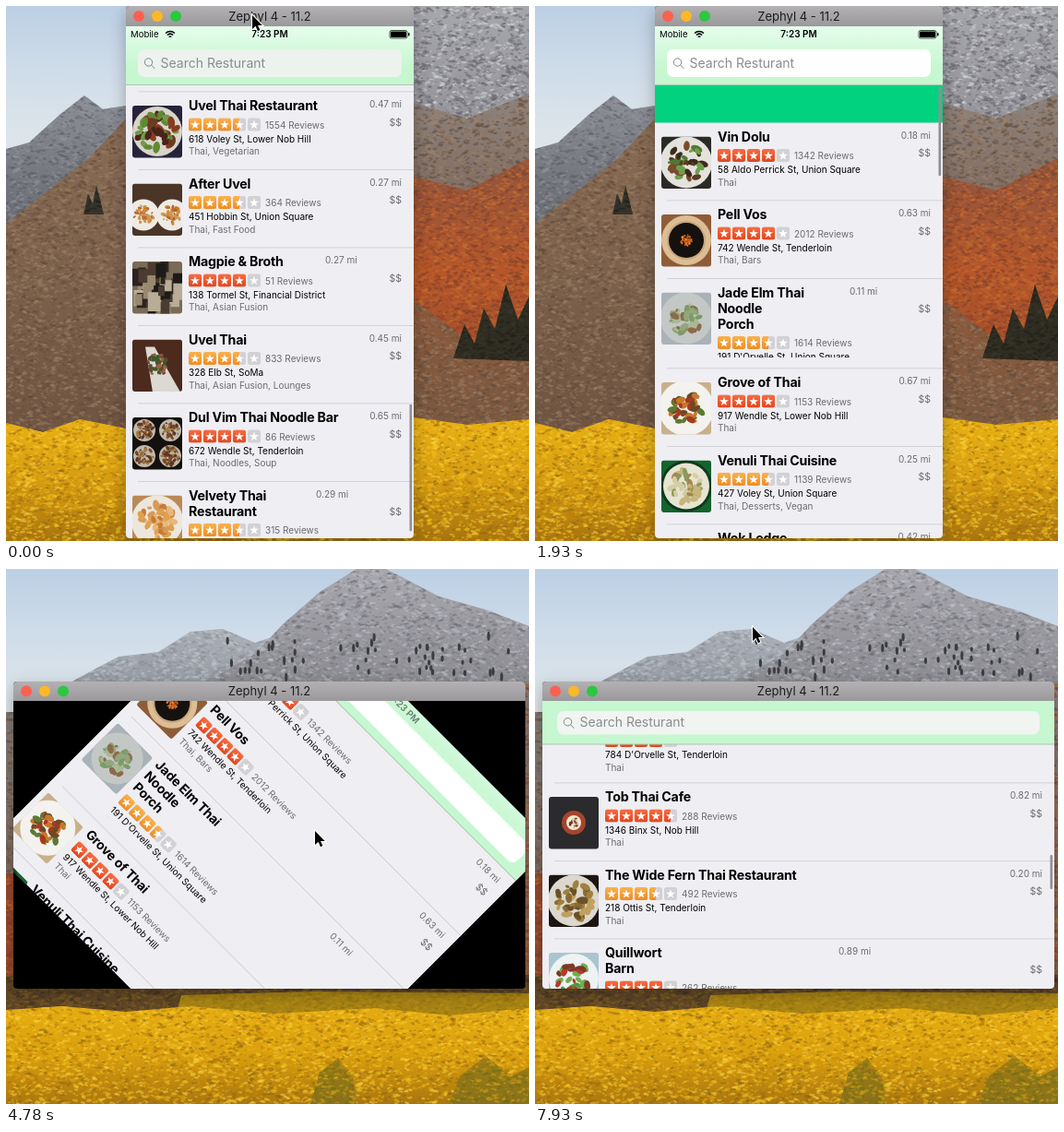
Animation, 567 px wide and 580 px high, one loop 8 s. Source, as an HTML page with a canvas:

```html
<!DOCTYPE html>
<html lang="en">
<head>
<meta charset="utf-8">
<title>Restaurant list, scrolled and rotated</title>
<style>
html, body { margin: 0; width: 100%; height: 100%; overflow: hidden; }
canvas { display: block; }
</style>
</head>
<body>
<canvas id="stage" width="567" height="580"></canvas>
<script>
const stage = document.getElementById('stage');
let c = stage.getContext('2d');
const FONT = 'Inter, "Open Sans", sans-serif';
const ROW = 84.5, LOOP = 8000;

// name lines split by "/"; photo: layout, backdrop, rings, food colours, spread
const rows = [
  ['Vin Dolu', '58 Aldo Perrick St, Union Square', 'Thai', 1342, 4, 0.18, 'one #2c2a26 #e4e2dc:28 #4f7a35,#5b3a22,#6f9e4a,#3d2a1c,#7a4b2c 23'],
  ['Pell Vos', '742 Wendle St, Tenderloin', 'Thai, Bars', 2012, 4, 0.63, 'one #8f5c38 #dcbd94:27,#c9a67c:21,#15110f:19 #e87f2a,#c95a1c 7'],
  ['Jade Elm Thai/Noodle/Porch', "191 D'Orvelle St, Union Square", 'Thai, Noodles', 1614, 3.5, 0.11, 'one #a9b2b8 #c3c8c6:28 #93a67c,#7d9a68,#8c6b4b,#a9b894 20', 211],
  ['Grove of Thai', '917 Wendle St, Lower Nob Hill', 'Thai', 1153, 4, 0.67, 'one #c9b08c #f4f2ee:30 #a5391f,#5c7a34,#c9762c,#6a4a26 20'],
  ['Venuli Thai Cuisine', '427 Voley St, Union Square', 'Thai, Desserts, Vegan', 1139, 3.5, 0.25, 'one #14642c #0d3a1c:28,#e6e4d2:25 #c7b57a,#8a9a5a,#a58550,#d6cca4 20'],
  ['Wok Ledge', '163 Ulm St, Financial District', 'Thai', 406, 4, 0.42, 'room #6b5444 - #3a2c26,#a8825c,#5c4638,#c0a888 30'],
  ['Plum Ladle Thai', '618 Mossen St, Tenderloin', 'Thai', 655, 4, 0.38, 'one #4a3325 #efece4:26 #c8782e,#6f8f3c,#9a4a24 20'],
  ['Sovi Garden', '235 Hobbin St, Union Square', 'Thai, Bars', 274, 3.5, 0.33, 'room #6a4a36 - #2a211c,#b08a5c,#d8b884 30'],
  ['Moro Thai/Noodle/Pantry', "784 D'Orvelle St, Tenderloin", 'Thai', 310, 4, 0.54, 'one #3a2c22 #f2efe8:26 #c88a3a,#5f8a38,#a54a22 20', 208],
  ['Tob Thai Cafe', '1346 Binx St, Nob Hill', 'Thai', 288, 4.5, 0.82, 'one #2b2a2c #a5452c:13,#f0e6d4:8 #5a2f20,#e6c9a4 6'],
  ['The Wide Fern Thai Restaurant', '218 Ottis St, Tenderloin', 'Thai', 492, 3.5, 0.20, 'one #1c1512 #dcd8ce:28 #a0803f,#8a6a34,#c0a060,#6b5028 23'],
  ['Quillwort/Barn', '1268 Tormel St, Nob Hill', 'Thai', 262, 4, 0.89, 'one #a9c5d0 #eef2f2:27 #4f9a3c,#b8382c,#6fae50,#7a3a28 21', 199],
  ['Ferny Spoon', '517 Mossen St, Nob Hill', 'Thai', 341, 4, 0.49, 'one #5a4030 #efeae0:26 #c87a2c,#6a8a38 20'],
  ['Lumo Thai', '844 Binx St, Tenderloin', 'Thai, Soup', 197, 4, 0.58, 'one #332820 #f0ece4:26 #b8642a,#d8a858 20'],
  ['Uvel Thai Restaurant', '618 Voley St, Lower Nob Hill', 'Thai, Vegetarian', 1554, 3.5, 0.47, 'one #26233a #d9d4ca:27 #5f8a34,#6a3c22,#4a2418,#8a3a22,#6f9a4a 24'],
  ['After Uvel', '451 Hobbin St, Union Square', 'Thai, Fast Food', 364, 3.5, 0.27, 'two #4a3526 #eeebe4:17 #d28a3c,#b8642a,#c89a5a 12'],
  ['Magpie & Broth', '138 Tormel St, Financial District', 'Thai, Asian Fusion', 51, 4, 0.27, 'room #7a6a58 - #2a241f,#b9ad98,#4a3c30,#98886e,#1d1a18 31', 216],
  ['Uvel Thai', '328 Elb St, SoMa', 'Thai, Asian Fusion, Lounges', 833, 3.5, 0.45, 'slant #4c2a1e - #5f4a34,#3a5a2c,#a0603c 14'],
  ['Dul Vim Thai Noodle Bar', '672 Wendle St, Tenderloin', 'Thai, Noodles, Soup', 86, 4, 0.65, 'four #14100e #c0b8ac:12 #7a4a28,#5c3820,#a07a48 11'],
  ['Velvety Thai/Restaurant', '392 Mossen St, Tenderloin', 'Thai, Noodles', 315, 3.5, 0.29, 'one #b98a58 #ece6dc:28 #e0a050,#c87a34,#e7b878,#d89a58 22', 206],
].map(([name, address, kind, reviews, stars, miles, photo, milesX]) =>
  ({ lines: name.split('/'), address, kind, reviews, stars, miles, photo, milesX }));

function random(seed) {
  return () => (seed = (seed * 16807 + 11) % 2147483647) / 2147483647;
}

// piecewise-linear value list from [time, ...values] keys
function at(keys, t) {
  let i = 1;
  while (i < keys.length - 1 && keys[i][0] < t) i++;
  const a = keys[i - 1], b = keys[i];
  const k = Math.min(1, Math.max(0, (t - a[0]) / (b[0] - a[0])));
  return a.slice(1).map((v, j) => v + (b[j + 1] - v) * k);
}
const mix = (a, b, k) => a + (b - a) * k;

const scrollKeys = [[0, 1201.5], [300, 1219], [600, 1224], [1330, 1224], [1480, 1090], [1630, 620],
  [1780, 150], [1930, -41], [2080, -22], [2230, -8], [2380, -2], [2530, 0], [6430, 0], [6580, 25],
  [6730, 110], [6880, 230], [7180, 510], [7480, 670], [7930, 780.5]];
const pointerKeys = [[0, 267, 10], [1180, 236, 440], [1330, 234, 449], [1480, 232, 520], [1630, 230, 600],
  [3980, 345, 600], [4180, 340, 525], [4780, 335, 284], [6280, 248, 319], [6430, 248, 319],
  [6880, 242, 200], [7180, 238, 132], [7480, 237, 132], [7630, 236, 60], [7930, 236, 63]];

function text(s, x, y, size, color = '#000', weight = 400, align = 'left') {
  c.font = `${weight} ${size}px ${FONT}`;
  c.fillStyle = color;
  c.textAlign = align;
  c.fillText(s, x, y + size * 0.36);
}
function box(x, y, w, h, r, fill) {
  c.beginPath();
  c.roundRect(x, y, w, h, r);
  c.fillStyle = fill;
  c.fill();
}
function oval(x, y, rx, ry, fill, turn = 0) {
  c.beginPath();
  c.ellipse(x, y, rx, ry, turn, 0, 7);
  c.fillStyle = fill;
  c.fill();
}
function fade(y0, y1, ...colors) {
  const g = c.createLinearGradient(0, y0, 0, y1);
  colors.forEach((color, i) => g.addColorStop(i / Math.max(1, colors.length - 1), color));
  return g;
}
function clipped(shape, draw) {
  c.save();
  c.beginPath();
  shape();
  c.clip();
  draw();
  c.restore();
}

function drawPhoto(look, seed, x, y) {
  const [layout, bg, rings, foods, spread] = look.split(' ');
  const rnd = random(seed * 977 + 5), colors = foods.split(',');
  const centres = { two: [[12, 34], [43, 34]], four: [[13, 14], [41, 14], [13, 42], [41, 42]] }[layout] || [[27, 28]];
  c.save();
  c.translate(x, y);
  clipped(() => c.roundRect(0, 0, 54, 56.5, 3), () => {
    c.fillStyle = bg;
    c.fillRect(0, 0, 54, 57);
    if (layout === 'slant') {
      c.fillStyle = '#dcd8d2';
      c.fill(new Path2D('M14 8L24 8 52 57 22 57Z'));
    }
    for (const [cx, cy] of centres) {
      if (rings !== '-') for (const ring of rings.split(',')) {
        const [color, r] = ring.split(':');
        oval(cx, cy, r, r, color);
      }
      for (let i = 0; i < 44; i++) {
        const a = rnd() * 6.3, d = spread * Math.sqrt(rnd()) * 0.85, size = spread * (0.1 + rnd() * 0.18);
        const px = cx + d * Math.cos(a), py = cy + d * Math.sin(a), color = colors[i % colors.length];
        if (layout === 'room') box(px - size, py - size, size * 1.6, size * 2.4, 0, color);
        else oval(px, py, size, size * 0.6, color, a * 3);
      }
    }
  });
  c.restore();
}

function drawStars(score, x, y) {
  const full = score < 4 ? fade(y, y + 14, '#fbb24c', '#f08c20') : fade(y, y + 14, '#fa6c40', '#e3451c');
  for (let i = 0; i < 5; i++) {
    const left = x + i * 16, part = Math.min(1, Math.max(0, score - i));
    box(left, y, 14, 14, 2.5, '#d2d2d5');
    if (part) clipped(() => c.rect(left, y, 14 * part, 14), () => box(left, y, 14, 14, 2.5, full));
    c.beginPath();
    for (let k = 0; k < 10; k++) {
      const r = k % 2 ? 2.1 : 5.2, a = k * Math.PI / 5;
      c.lineTo(left + 7 + r * Math.sin(a), y + 7.4 - r * Math.cos(a));
    }
    c.fillStyle = '#fff';
    c.fill();
  }
}

function drawRow(row, index, y, height, w, turn, hideMiles) {
  const shift = (row.lines.length - 1) * 17, gray = '#6b6b70';
  drawPhoto(row.photo, index + 1, 7, y + 15);
  clipped(() => c.rect(0, y, w, height - 12), () => {
    c.letterSpacing = '-0.2px';
    row.lines.forEach((line, i) => text(line, 68, y + 15 + i * 17, 14.2, '#000', 700));
    c.letterSpacing = '0px';
    drawStars(row.stars, 68, y + 28.5 + shift);
    text(row.reviews + ' Reviews', 151, y + 36 + shift, 10, gray);
    text(row.address, 68, y + 51 + shift, 10);
    text(row.kind, 68, y + 64.5 + shift, 10, gray);
  });
  const miles = row.miles.toFixed(2) + ' mi';
  if (!row.milesX) text(miles, w - 13, y + 13.5, 10, gray, 400, 'right');
  else if (!hideMiles) text(miles, row.milesX + (turn ? 122 : 0), y + 13.5, 10, gray);
  text('$$', w - 13, y + 33, 10.5, gray, 400, 'right');
  c.fillStyle = '#cbcbd0';
  c.fillRect(13, y + height - 0.5, w, 0.8);
}

function drawStatus(w) {
  text('Mobile', 5, 8.5, 9.6);
  text('7:23 PM', w / 2, 8.5, 10, '#000', 600, 'center');
  c.strokeStyle = '#000';
  c.lineWidth = 1.5;
  for (const r of [2, 4.7, 7.4]) {
    c.beginPath();
    c.arc(48, 13, r, -2.3, -0.84);
    c.stroke();
  }
  c.lineWidth = 0.7;
  c.beginPath();
  c.roundRect(w - 26, 4.5, 19, 8.5, 2);
  c.stroke();
  box(w - 25, 5.5, 17, 6.5, 1, '#000');
  box(w - 6, 7, 1.5, 3.5, 1, '#000');
}

function drawHeader(w, h, turn, field) {
  c.fillStyle = fade(-80 * turn, mix(45, 1, turn), '#e6fdec', '#c6f7d0');
  c.fillRect(0, 0, w, h);
  c.fillStyle = '#a8c9b0';
  c.fillRect(0, h - 0.5, w, 1);
  c.globalAlpha = 1 - turn;
  drawStatus(w);
  c.globalAlpha = 1;
  const x = mix(13, 16, turn), y = mix(25, 11, turn), fh = mix(30, 25.5, turn), mid = y + fh / 2;
  box(x, y, w - x * 2, fh, 7, field);
  c.strokeStyle = '#85858a';
  c.lineWidth = 1;
  c.beginPath();
  c.arc(x + 11.5, mid - 1, 4.2, 0, 7);
  c.moveTo(x + 14.5, mid + 2);
  c.lineTo(x + 18.5, mid + 6);
  c.stroke();
  text('Search Resturant', x + 24.5, mid - 0.5, 14, '#8b8b90');
}

function drawApp(t, turn, w, h) {
  const header = mix(63.5, 47, turn), view = h - header, [scroll] = at(scrollKeys, t);
  c.fillStyle = '#efeef3';
  c.fillRect(0, 0, w, h);
  if (scroll < 0) box(0, header, w, -scroll, 0, '#00d27f');
  const heights = rows.map(row => ROW + (row.lines.length > 2 ? mix(13, 31, turn) : 0));
  const total = heights.reduce((sum, height) => sum + height);
  let y = header - scroll;
  rows.forEach((row, i) => {
    if (y < h && y + heights[i] > 0) drawRow(row, i, y, heights[i], w, turn, t >= 3130 && turn < 0.02);
    y += heights[i];
  });
  if (t < 3430 || t >= 6580) {
    const size = view * view / total + Math.min(0, scroll);
    box(w - 4.5, header + 2 + Math.max(0, scroll) / total * view, 2.6, size - 3, 1.3, '#8f8f95');
  }
  const field = t < 1180 ? '#ecf3ee' : t >= 6580 ? '#f0f5f1' : t >= 3130 && turn < 0.1 ? '#eafaee' : '#fff';
  drawHeader(w, header, turn, field);
}

function drawWindow(t, x, y, w, bar, h) {
  c.save();
  c.shadowColor = 'rgba(0,0,0,.28)';
  c.shadowBlur = 18;
  c.shadowOffsetY = 6;
  box(x, y, w, bar + h, 4, '#000');
  c.restore();
  box(x, y, w, bar, [4, 4, 0, 0], fade(y, y + bar, '#b3b1b3', '#9a989b'));
  ['#fb6150', '#fcb827', '#2bc840'].forEach((color, i) => oval(x + 14 + i * 20, y + bar / 2, 6, 6, color));
  text('Zephyl 4 - 11.2', x + w / 2, y + bar / 2, 13, '#1c1c1c', 400, 'center');
  const k = Math.min(1, Math.max(0, (t - 3280) / 3000));
  const turn = (1 - Math.cos(Math.PI * k)) / 2, wide = t >= 3130;
  const aw = mix(312, 555, turn), ah = mix(555, 312, turn);
  clipped(() => c.roundRect(x, y + bar, w, h, [0, 0, 4, 4]), () => {
    c.translate(x + w / 2, y + bar + h / 2);
    if (wide) c.rotate((1 - turn) * Math.PI / 2);
    c.translate(-aw / 2, -ah / 2);
    clipped(() => c.rect(0, 0, aw, ah), () => drawApp(t, turn, aw, ah));
  });
}

function drawPointer(x, y) {
  c.save();
  c.translate(x, y);
  const arrow = new Path2D('M0 0V15L3.6 11.8 6 17.2 8.4 16.1 6 10.9H10.8Z');
  c.lineWidth = 2;
  c.strokeStyle = '#fff';
  c.stroke(arrow);
  c.fillStyle = '#000';
  c.fill(arrow);
  c.restore();
}

// landscapes: soft gradients with fine seeded specks
function scenery(paint) {
  const layer = document.createElement('canvas'), screen = c, rnd = random(4242);
  layer.width = 567;
  layer.height = 580;
  c = layer.getContext('2d');
  c.fillStyle = fade(0, 140, '#bccfe4', '#cfdce9', '#dde5ea');
  c.fillRect(0, 0, 567, 580);
  paint((path, base, specks, x, y, w, h, size = 2.6) => {
    const shape = new Path2D(path), colors = specks.split(',');
    c.fillStyle = fade(y, y + h, ...base.split(','));
    c.fill(shape);
    c.save();
    c.clip(shape);
    c.globalAlpha = 0.5;
    for (let i = 0; i < w * h / (size * size * 1.6); i++) {
      const s = size * (0.3 + rnd());
      oval(x + rnd() * w, y + rnd() * h, s, s * 0.45, colors[i % colors.length], -0.5 + rnd());
    }
    c.restore();
  });
  c = screen;
  return layer;
}
const ROCK = '#6a6a72,#a5a5ab,#83838a,#c3c6cd', SOIL = '#5f4939,#94765d,#6f5644,#a08468';
const GOLD = '#f8c81c,#b87c0c,#e8ae10,#8c6412,#fbd540', RUST = '#c9642c,#8a3d26,#c9722f,#75432f';
const FIR = '#1d1f18,#3a382a';

const tallScene = scenery(patch => {
  patch('M0 155L25 148 58 118 85 97 105 112 130 108V260H0Z', '#8d9098,#63646b', '#565861,#94959c,#74767e', 0, 97, 130, 160);
  patch('M0 236L40 205 90 165 130 122V490H0Z', '#8a6c55,#7b604b,#6d5340', SOIL, 0, 122, 130, 368);
  patch('M84 226L89 203 94 215 98 194 106 226Z', '#33332b', FIR, 84, 194, 22, 32);
  patch('M442 0H567V210H442Z', '#a6a7ad,#86858a', '#d9dce2,#6c6a70,#a5a4aa,#5b5a60', 442, 0, 125, 210);
  patch('M442 105L500 122 567 95V220H442Z', '#8c8480,#7f6a5e', SOIL, 442, 95, 125, 125);
  patch('M442 185L500 200 567 165V410H442Z', '#8d5640,#b5562a,#9c4c2b', RUST, 442, 165, 125, 240);
  patch('M442 318L500 362 567 378V480H442Z', '#8f5a3c,#765840', SOIL, 442, 318, 125, 160);
  patch('M485 382L497 345 508 366 518 328 530 350 542 302 555 340 567 315V385Z', '#2f2c21', FIR, 485, 300, 82, 90);
  patch('M0 452L40 462 80 448 130 458 442 446 500 454 567 448V580H0Z', '#e9b214,#d69c12,#a8740f', GOLD, 0, 446, 567, 134);
});
const wideScene = scenery(patch => {
  patch('M75 120L122 95 165 90 200 68 235 65 270 80 300 70V130H60Z', '#a9aeb6,#9599a1', '#858a94,#c6cad0,#b0b4bc', 75, 65, 230, 65);
  patch('M218 122L270 92 300 60 340 25 380 0H412L470 30 520 44 567 62V130H200Z', '#a8a8ae,#8a8a90', ROCK, 218, 0, 349, 130);
  const firs = random(77);
  for (let i = 0; i < 55; i++) {
    const x = 240 + firs() * 320, y = 72 + firs() * 46;
    oval(x, y, 1.6, 2.5 + firs() * 2.5, '#3b3d3f');
  }
  patch('M0 155H8V330H0Z', '#7d7a7a,#7d6a5e', SOIL, 0, 155, 8, 175);
  patch('M0 330H8V460H0Z', '#94492c', RUST, 0, 330, 8, 130);
  patch('M560 122H567V460H560Z', '#8a8280,#8a5b40', RUST, 560, 122, 8, 338);
  patch('M0 440H567V500H0Z', '#5e4527', '#3e3020,#76552a,#8a6a1c', 0, 440, 567, 60);
  patch('M190 462L330 458 567 460V500H180Z', '#a98414', '#8f7212,#bc9416', 190, 458, 377, 42);
  patch('M0 478L60 474 130 480 200 474 290 482 400 476 480 484 567 476V580H0Z', '#e6ae12,#dba00e,#a9760f', GOLD, 0, 470, 567, 110);
  patch('M330 580L340 546 360 530 376 552 380 580ZM480 580L492 550 520 528 548 550 567 540V580Z', '#a07d14,#87701a', '#6d6a14,#c89a14,#8a7a18,#d8a818', 330, 525, 237, 55);
});

let shown = -1;
function frame(now) {
  const t = now % LOOP;
  const step = t < 1180 ? Math.floor(t / 150) * 150 : 1180 + Math.floor((t - 1180) / 150) * 150;
  if (step !== shown) {
    shown = step;
    const wide = step >= 3130;
    c.drawImage(wide ? wideScene : tallScene, 0, 0);
    if (wide) drawWindow(step, 8, 122, 555, 21, 312);
    else drawWindow(step, 130, 0, 312, 22, 555);
    drawPointer(...at(pointerKeys, step));
  }
  requestAnimationFrame(frame);
}
requestAnimationFrame(frame);
</script>
</body>
</html>
```
